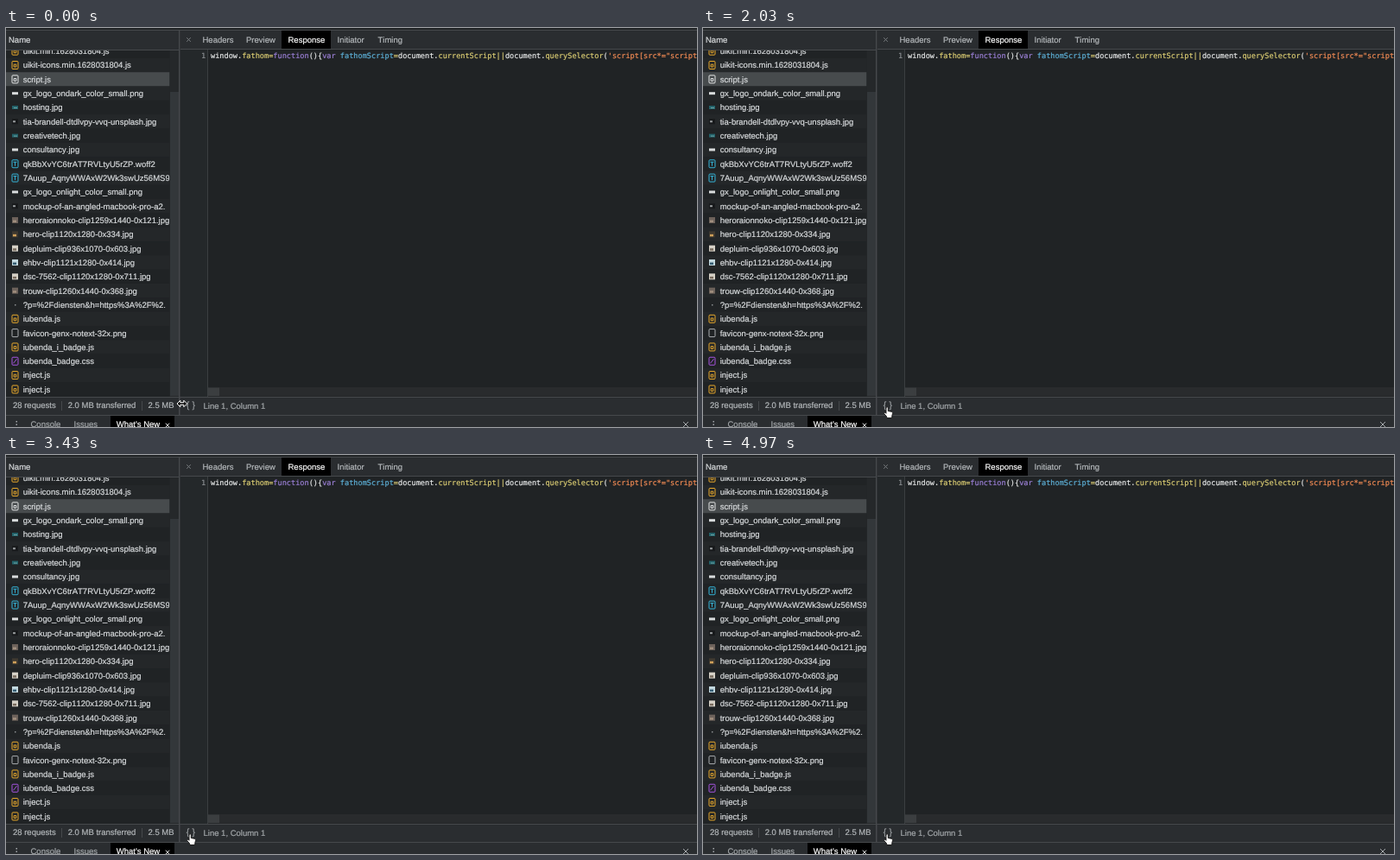
Recreate the animation shown at these times as an HTML page. Size 800 by 462 pixels, loop 5.04 s.

```html
<!DOCTYPE html>
<html lang="en">
<head>
<meta charset="utf-8">
<title>Pretty print</title>
<style>
  html, body { margin: 0; width: 100%; height: 100%; overflow: hidden; background: #202325; }
  svg { display: block; width: 800px; height: 462px; }
  text {
    font: 9.5px "Liberation Sans", Arial, sans-serif; font-kerning: none;
    white-space: pre; text-rendering: geometricPrecision;
    fill: currentColor; stroke: currentColor; stroke-width: .2;
  }
  .code { font: 8.58px "DejaVu Sans Mono", Menlo, monospace; color: #e8eaea; }
  .string { color: #f28b54; }
  .keyword { color: #9a7fd5; }
  .def { color: #5db0d7; }
  .prop { color: #d9cb72; }
  .num { color: #9980ff; }
</style>
</head>
<body>
<svg id="stage" viewBox="0 0 800 462" xmlns="http://www.w3.org/2000/svg"></svg>
<script>
const LOOP = 5040;
const TOGGLES = [1330, 1960, 2520, 3150, 3710, 4340];
const TOOLTIP_AT = 770;
const ROW = 16.32, LINE = 10.11;
const LINE_COLOR = '#46494c', BAR = '#2a2d30', DIM = '#a4a8ab';

const escapeText = s => s.replace(/&/g, '&amp;').replace(/</g, '&lt;');
const rect = (x, y, w, h, fill, extra = '') =>
  `<rect x="${x}" y="${y}" width="${w}" height="${h}" fill="${fill}" ${extra}/>`;
const text = (x, y, s, color = '#d9dcde', extra = '') =>
  `<text x="${x}" y="${y}" style="color:${color};${extra}">${escapeText(s)}</text>`;
const cross = (x, y, r, color) =>
  `<path d="M${x - r} ${y - r}l${2 * r} ${2 * r}m0 ${-2 * r}l${-2 * r} ${2 * r}" stroke="${color}" fill="none"/>`;

// Syntax colouring
const TOKENS = new RegExp([
  /(?<string>"[^"]*"|'[^']*')/,
  /(?<keyword>\b(?:function|var|void|return|new|if|switch|case|break)\b)/,
  /(?<def>(?<=(?:function|var|^ +,) )\w+)/,
  /(?<prop>(?<=\.)\w+|[=!|&?]+)/,
  /(?<num>\b\d+)/
].map(r => r.source).join('|'), 'g');

function codeLine(s, i) {
  let out = '', last = 0;
  for (const m of s.matchAll(TOKENS)) {
    const kind = Object.keys(m.groups).find(k => m.groups[k]);
    out += escapeText(s.slice(last, m.index)) + `<tspan class="${kind}">${escapeText(m[0])}</tspan>`;
    last = m.index + m[0].length;
  }
  return `<text class="code" x="237" y="${35.2 + i * LINE}">${out}${escapeText(s.slice(last))}</text>`;
}
const lineMark = (s, i, color) =>
  `<text class="code" x="226" y="${35.2 + i * LINE}" style="color:${color}">${s}</text>`;

const MINIFIED = `window.fathom=function(){var fathomScript=document.currentScript||document.querySelector('script[src*="script.js"][site]')`;
const PRETTY = `window.fathom = function() {
    var fathomScript = document.currentScript || document.querySelector('script[src*="script.js"][site]') || 0
      , siteId = fathomScript.getAttribute("data-site") || fathomScript.getAttribute("site")
      , honorDNT = !1
      , auto = !0
      , canonical = !0
      , excludedDomains = []
      , allowedDomains = [];
    "true" == (fathomScript.getAttribute("data-honor-dnt") || fathomScript.getAttribute("honor-dnt")) && (honorDNT = !0),
    "false" == (fathomScript.getAttribute("data-auto") || fathomScript.getAttribute("auto")) && (auto = !1),
    "false" == (fathomScript.getAttribute("data-canonical") || fathomScript.getAttribute("canonical")) && (canonical = !1),
    (fathomScript.getAttribute("data-excluded-domains") || fathomScript.getAttribute("excluded-domains")) && (
    fathomScript.getAttribute("data-included-domains") || fathomScript.getAttribute("included-domains") ? allowed
    function trackPageview() {
        window.fathom.trackPageview()
    }
    function spaHistory() {
        var pushState;
        void 0 !== history && (pushState = history.pushState,
        history.pushState = function() {
            var ret = pushState.apply(history, arguments);
            return window.dispatchEvent(new Event("pushstate")),
            window.dispatchEvent(new Event("locationchangefathom")),
            ret
        }
        ,
        window.addEventListener("popstate", function() {
            window.dispatchEvent(new Event("locationchangefathom"))
        }),
        window.addEventListener("locationchangefathom", trackPageview))
    }
    function spaHash() {
        window.addEventListener("hashchange", trackPageview)
    }
    if (fathomScript.getAttribute("data-spa") || fathomScript.getAttribute("spa"))
        switch (fathomScript.getAttribute("data-spa") || fathomScript.getAttribute("spa")) {
        case "history":
            spaHistory();
            break;`.split('\n');

// Network list: icon kind, then file name
const FILES = `js uikit.min.1628031804.js
js uikit-icons.min.1628031804.js
sel script.js
flat gx_logo_ondark_color_small.png
teal hosting.jpg
dark tia-brandell-dtdlvpy-vvq-unsplash.jpg
teal creativetech.jpg
flat consultancy.jpg
font qkBbXvYC6trAT7RVLtyU5rZP.woff2
font 7Auup_AqnyWWAxW2Wk3swUz56MS9.
flat gx_logo_onlight_color_small.png
dark mockup-of-an-angled-macbook-pro-a2.
brown heroraionnoko-clip1259x1440-0x121.jpg
gold hero-clip1120x1280-0x334.jpg
pale depluim-clip936x1070-0x603.jpg
sky ehbv-clip1121x1280-0x414.jpg
pale dsc-7562-clip1120x1280-0x711.jpg
brown trouw-clip1260x1440-0x368.jpg
dot ?p=%2Fdiensten&h=https%3A%2F%2.
js iubenda.js
blank favicon-genx-notext-32x.png
js iubenda_i_badge.js
css iubenda_badge.css
js inject.js
js inject.js`.split('\n').map(s => s.split(' '));

function icon(kind, y) {
  const sheet = (color, inner = '') =>
    rect(7, y - 4.5, 7, 9, 'none', `rx="1" stroke="${color}"`) +
    `<path d="${inner}" transform="translate(10.5 ${y})" stroke="${color}" fill="none"/>`;
  const ring = 'M-1.3 -.8h2.6v2.8h-2.6z';
  const photo = (a, b) => rect(7, y - 3.5, 7, 7, a) + rect(8, y, 4, 2.5, b);
  return {
    js: () => sheet('#e8a92c', ring),
    sel: () => sheet('#e6e8e8', ring),
    font: () => sheet('#35b5d9', 'M-2 -2h4M0 -2v4.5'),
    css: () => sheet('#a655e0', 'M-2 2.5l4 -5'),
    blank: () => sheet('#a9adb0'),
    flat: () => rect(7, y - 1.5, 7, 3, '#d8dbdc'),
    teal: () => rect(7, y - 2, 7, 4, '#24636b') + rect(9, y, 4, 1, '#6fa5a7'),
    dark: () => rect(7, y - 3, 7, 6, '#17191b') + rect(8, y - 1, 3, 2, '#999d9f'),
    brown: () => photo('#6d625b', '#a08e7e'),
    gold: () => photo('#3f3930', '#d0a05a'),
    pale: () => photo('#d5d0c6', '#786b5e'),
    sky: () => photo('#c2d8df', '#345c72'),
    dot: () => rect(10, y - .5, 1.5, 1.5, '#8c9092')
  }[kind]();
}

function fileRow([kind, name], i) {
  const y = 26.7 + i * ROW;
  const fill = kind === 'sel' ? '#474b4d' : i % 2 ? '#242729' : '#202325';
  return rect(0, y - ROW / 2, 190, ROW, fill) + icon(kind, y) + text(19.7, y + 3.4, name);
}

const sidebar =
  rect(0, 0, 200, 462, '#202325') +
  `<g clip-path="url(#list)">${FILES.map(fileRow).join('')}</g>` +
  rect(189.5, 25, 11, 402, '#25282a') + rect(190, 74, 10, 352, '#33373a') +
  rect(0, 3, 200, 22, BAR) + rect(0, 25, 200, 1, LINE_COLOR) +
  text(3, 17.3, 'Name');

const tabs = [['Headers', 227.5], ['Preview', 278], ['Response', 326.5], ['Initiator', 383.5], ['Timing', 430.5]];
const topBar =
  rect(202, 3, 598, 21, BAR) + rect(319, 3, 57, 21, '#000') + rect(202, 24, 598, 1, LINE_COLOR) +
  cross(211.5, 13.5, 2.3, '#777b7e') +
  tabs.map(([s, x]) => text(x, 16.9, s, s === 'Response' ? '#fff' : '#b4b8bb')).join('');

const bottomBars =
  rect(0, 427, 800, 35, BAR) + rect(0, 427, 800, 1, LINE_COLOR) + rect(0, 448, 800, 1, LINE_COLOR) +
  text(8, 440.4, '28 requests', '#b4b8bb') + text(71.7, 440.4, '2.0 MB transferred', '#b4b8bb') +
  text(164.5, 440.4, '2.5 MB', '#b4b8bb') + text(228.5, 440.9, 'Line 1, Column 1', DIM) +
  rect(64, 432, 1, 11, LINE_COLOR) + rect(157, 432, 1, 11, LINE_COLOR) +
  [455, 458.5, 462].map(y => rect(11.5, y, 1.5, 1.5, DIM)).join('') +
  text(28.5, 462.3, 'Console', DIM) + text(78.5, 462.3, 'Issues', DIM) +
  rect(121, 449, 74, 13, '#000') + text(127.8, 462.3, "What's New", '#fff') +
  cross(187, 460, 2.3, '#e0e2e3') + cross(787, 459, 3, DIM);

const scrollbar = width =>
  rect(234, 416, 566, 10.5, '#292b2d') + rect(234, 416.5, width, 9.5, '#3b3e40');

const minifiedView = codeLine(MINIFIED, 0) + lineMark(1, 0, '#8d9194') + scrollbar(13);

const prettyView =
  `<g clip-path="url(#code)">${PRETTY.map(codeLine).join('')}</g>` +
  PRETTY.map((_, i) => lineMark(i ? '-' : 1, i, '#3b8fb0')).join('') +
  rect(789, 25, 11, 391, '#292b2d') + rect(789.5, 26, 9.5, 80, '#414447') + scrollbar(128);

const brace = (x, s) => text(x, 440.3, s, 'inherit', 'font-size:10.5px');

const resizeCursor =
  `<path id="resize" d="M198 435l3.8 -3.8v2.5h4v-2.5l3.8 3.8l-3.8 3.8v-2.5h-4v2.5z" fill="#111" stroke="#fff"/>`;
const handCursor =
  `<path id="hand" d="M-1.5 1.5C-1.5 -.3 .8 -.3 .8 1.5V5L4.8 5.8C6 6.1 6.2 7 6 8L5.2 11V13H-.8V11.5L-3.7 8.2C-4.4 7 -3 6.2 -2.2 7L-1.5 7.8Z" fill="#fff" stroke="#111" stroke-width=".9"/>`;

const stage = document.getElementById('stage');
stage.innerHTML =
  `<defs><clipPath id="list">${rect(0, 25, 189.5, 402, '#000')}</clipPath>
   <clipPath id="code">${rect(234, 25, 555, 391, '#000')}</clipPath></defs>` +
  rect(0, 0, 800, 462, '#202325') + sidebar +
  rect(202, 25, 31, 402, '#24282a') + rect(233, 25, 1, 402, '#3b3f41') +
  `<g id="minified">${minifiedView}</g><g id="pretty">${prettyView}</g>` +
  topBar + bottomBars +
  rect(200, 3, 1.5, 445, LINE_COLOR) + rect(0, 0, 800, 2, '#202325') + rect(0, 2, 800, 1, LINE_COLOR) +
  `<g id="braces">${brace(208.8, '{')}${brace(215.6, '}')}</g>` +
  `<g id="tooltip">${rect(204.5, 451.5, 58.5, 14, '#0b0c0d', 'stroke="#55595c"')}${text(209.7, 463, 'Pretty print', '#e0e2e3')}</g>` +
  resizeCursor + handCursor;

const part = Object.fromEntries([...stage.querySelectorAll('[id]')].map(el => [el.id, el]));
const show = (el, on) => { el.style.display = on ? '' : 'none'; };

function render(t) {
  const clicks = TOGGLES.filter(at => t >= at).length;
  const pretty = clicks % 2 === 1;
  show(part.pretty, pretty);
  show(part.minified, !pretty);
  show(part.tooltip, t >= TOOLTIP_AT && !clicks);
  show(part.resize, t < 70);
  show(part.hand, t >= 70);

  const rest = (1 - Math.min(1, t / 350)) ** 2;
  part.hand.setAttribute('transform', `translate(${213.5 - 9 * rest} ${438.5 - 4 * rest})`);

  const hovered = t >= 210 && !clicks;
  part.braces.style.color = pretty ? '#8fc4e0' : hovered ? '#fff' : '#989c9f';
  part.braces.style.fontWeight = hovered ? 'bold' : '';
}

function tick(now) {
  render(now % LOOP);
  requestAnimationFrame(tick);
}
render(0);
requestAnimationFrame(tick);
</script>
</body>
</html>
```
